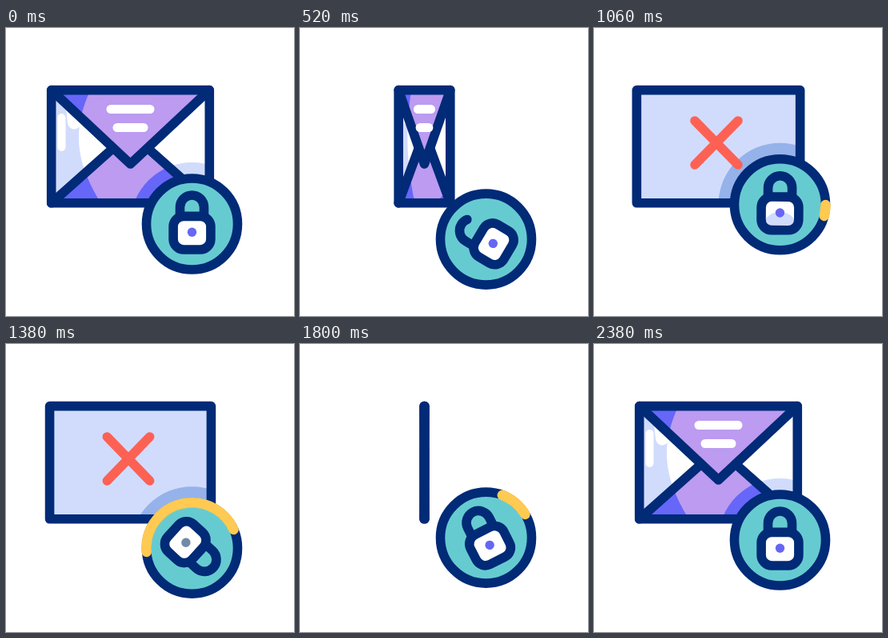
These frames come from a looping animation (360 by 360 pixels, 2.4 s). An HTML page with a canvas:

```html
<!DOCTYPE html>
<html lang="en">
<head>
<meta charset="utf-8">
<title>Secure mail</title>
<style>
html, body { margin: 0; width: 100%; height: 100%; overflow: hidden; background: #fff; }
canvas { display: block; width: 360px; height: 360px; }
</style>
</head>
<body>
<canvas id="stage" width="360" height="360"></canvas>
<script>
const ctx = document.getElementById('stage').getContext('2d');
const LOOP = 2400, RAD = Math.PI / 180;
const NAVY = '#012a77', TEAL = '#66cbd0', PURPLE = '#bc9bf0', VIOLET = '#6666f8',
      PALE = '#d1dcfc', BLUE = '#95b2ea', RED = '#fd6154', YELLOW = '#ffca52', WHITE = '#fff';
const CX = 155.5, TOP = 77.6, BOTTOM = 218.8, BX = 232.5, STROKE = 11.6;

// Key poses [ms, value]: the badge dips, jumps and settles; the lock winds up, then spins once.
const bob = [[0, 245], [690, 267.5], [1100, 219.5], [1520, 267.5], [1700, 239.5], [1930, 246], [2400, 245]];
const twist = [[0, 0], [730, -74], [1060, 0], [1380, 132], [1800, 333], [2250, 360]];

// Smooth monotone curve through the key poses, at rest on every extreme.
function at(keys, t) {
  const last = keys.length - 1;
  if (t >= keys[last][0]) return keys[last][1];
  const i = keys.findIndex(k => k[0] > t) - 1;
  const rate = k => (keys[k + 1][1] - keys[k][1]) / (keys[k + 1][0] - keys[k][0]);
  const slope = k => {
    if (k === 0 || k === last) return 0;
    const a = rate(k - 1), b = rate(k);
    return a * b <= 0 ? 0 : 2 * a * b / (a + b);
  };
  const [t0, v0] = keys[i], [t1, v1] = keys[i + 1];
  const d = t1 - t0, u = (t - t0) / d, w = 1 - u;
  return v0 * (1 + 2 * u) * w * w + slope(i) * d * u * w * w
       + v1 * u * u * (3 - 2 * u) - slope(i + 1) * d * u * u * w;
}

// Steady turn that lingers on each face of the card.
const turn = t => 360 * t / LOOP - 18 * Math.sin(4 * Math.PI * t / LOOP);
const pulse = (t, mid, reach) => Math.max(0, 1 - Math.abs(t - mid) / reach);

function poly(points, close) {
  const p = new Path2D();
  points.forEach(([x, y]) => p.lineTo(x, y));
  if (close) p.closePath();
  return p;
}

function circle(x, y, r) {
  const p = new Path2D();
  p.arc(x, y, r, 0, 7);
  return p;
}

function fill(path, color) {
  ctx.fillStyle = color;
  ctx.fill(path);
}

function line(path, color = NAVY, width = STROKE) {
  ctx.strokeStyle = color;
  ctx.lineWidth = width;
  ctx.stroke(path);
}

function panel(path, base, tint, shades) {
  ctx.save();
  ctx.clip(path);
  fill(path, base);
  shades.forEach(s => fill(s, tint));
  ctx.restore();
}

function card(t, by) {
  const c = Math.cos(turn(t) * RAD), s = Math.abs(c);
  const half = c > 0 ? 98.8 : 103.4;
  const px = x => CX + x * s;
  const pts = (list, close) => poly(list.map(([x, y]) => [px(x), y]), close);
  const frame = pts([[-half, TOP], [half, TOP], [half, BOTTOM], [-half, BOTTOM]], true);
  const shadow = circle(BX, by, 77);

  if (c < 0) {
    panel(frame, PALE, BLUE, [shadow]);
    for (const x of [27.3 * s, -27.3 * s]) line(poly([[153 - x, 116], [153 + x, 171]]), RED);
  } else {
    const side = new Path2D();
    side.moveTo(px(-half), TOP);
    side.lineTo(px(-50), TOP);
    side.bezierCurveTo(px(-72), 125, px(-70), 165, px(-37), BOTTOM);
    side.lineTo(px(-half), BOTTOM);
    const front = [[-half, BOTTOM], [0, 131], [half, BOTTOM]];
    const flap = [[-half, TOP], [0, 170], [half, TOP]];
    panel(frame, WHITE, PALE, [side, shadow]);
    line(pts([[-86, 112], [-86, 149]]), WHITE, 10 * s);
    line(pts([[-72, 100], [-70, 118]]), WHITE, 17 * s);
    panel(pts(front, true), PURPLE, VIOLET, [side, shadow]);
    line(pts(front));
    panel(pts(flap, true), PURPLE, VIOLET, [side]);
    line(pts(flap));
    line(pts([[-24.5, 101.5], [24.5, 101.5]]), WHITE, 11);
    line(pts([[-16.5, 124.5], [16.5, 124.5]]), WHITE, 11);
  }
  line(frame);
}

function lock(t, spin) {
  const bow = new Path2D();
  bow.moveTo(-15, -9.5);
  bow.arc(0, -21, 15, Math.PI, 0);
  bow.lineTo(15, -9.5);
  // The bow opens while the lock is wound back.
  ctx.setLineDash([70.2 + 0.43 * Math.min(0, spin), 200]);
  line(bow);
  ctx.setLineDash([]);

  const body = new Path2D();
  body.roundRect(-23.4, -9.6, 46.8, 41.6, 13);
  fill(body, WHITE);
  ctx.save();
  ctx.clip(body);
  ctx.globalAlpha = pulse(t, 1060, 110);
  fill(circle(0, 31, 22), PALE);
  ctx.restore();
  line(body);
  const grey = pulse(t, 1380, 200);
  fill(circle(0, 10.3, 5.7), `rgb(${102 + 10 * grey}, ${102 + 36 * grey}, ${245 - 77 * grey})`);
}

function badge(t, by) {
  const spin = at(twist, t);
  ctx.save();
  ctx.translate(BX, by);
  const ring = circle(0, 0, 57);
  fill(ring, TEAL);
  line(ring);
  ctx.rotate(spin * RAD);
  // Both ends of the arc run one full circle: the head leaves early, the tail catches up.
  const u = (t - 1040) / 800;
  if (u > 0 && u < 1) {
    const arc = new Path2D();
    arc.arc(0, 0, 57, 2 * Math.PI * u ** 2.5, 2 * Math.PI * (1 - (1 - u) ** 1.5));
    line(arc, YELLOW, 12.5);
  }
  lock(t, spin);
  ctx.restore();
}

function draw(t) {
  ctx.fillStyle = WHITE;
  ctx.fillRect(0, 0, 360, 360);
  const by = at(bob, t);
  card(t, by);
  badge(t, by);
}

ctx.lineCap = ctx.lineJoin = 'round';
const start = performance.now();
function tick() {
  draw((performance.now() - start) % LOOP);
  requestAnimationFrame(tick);
}
tick();
</script>
</body>
</html>
```
